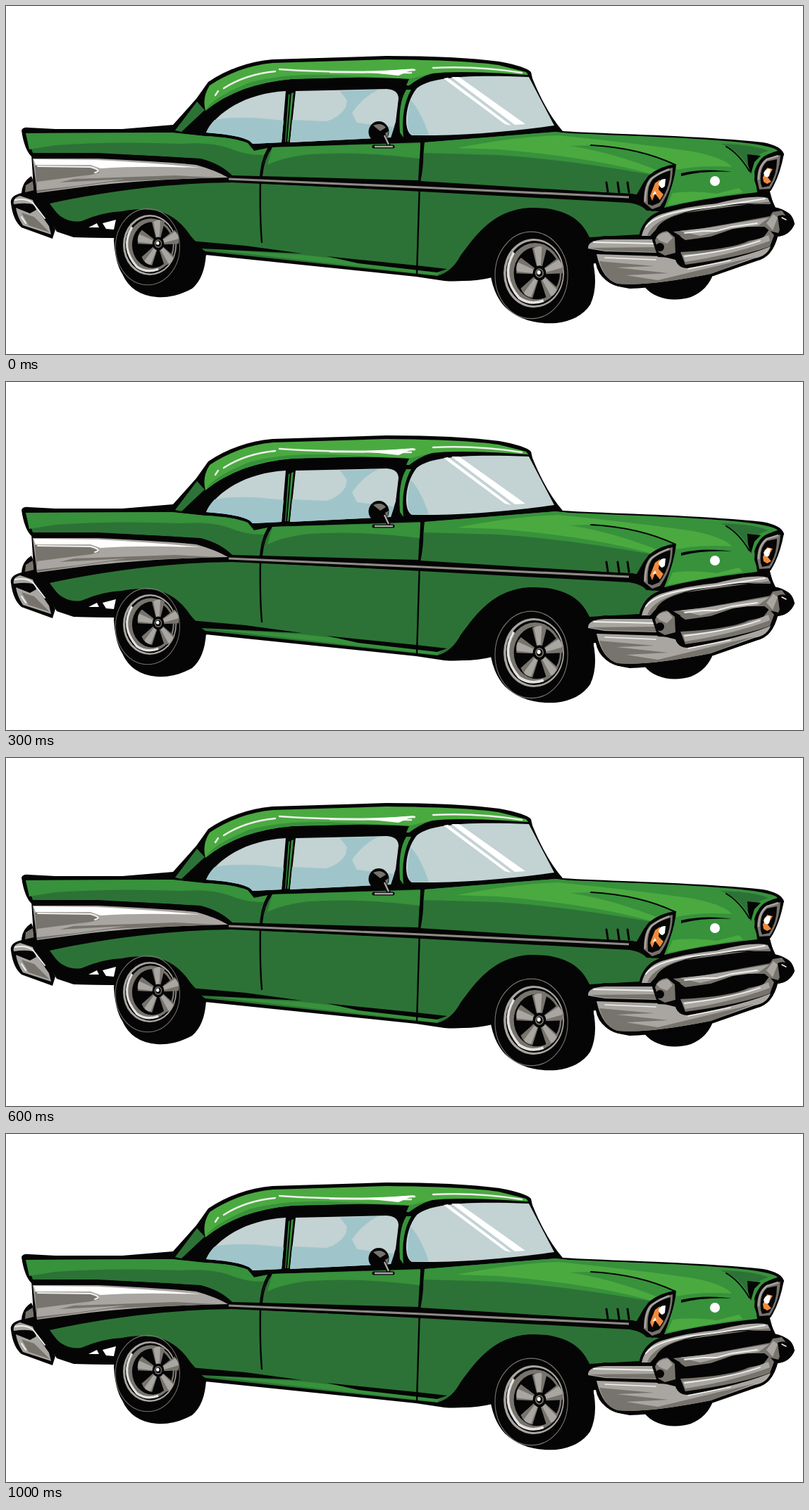
Recreate the animation shown at these times as an HTML page. Size 1131 by 495 pixels, loop 1100 ms.

```html
<!DOCTYPE html>
<html lang="en">
<head>
<meta charset="utf-8">
<title>Green classic car</title>
<style>
html, body { margin: 0; width: 100%; height: 100%; overflow: hidden; background: #fff; }
svg { display: block; width: 100%; height: 100%; }
path { fill: none; }
.k { fill: #050505; }
.d { fill: #2c7236; }
.m { fill: #37923b; }
.b { fill: #4aaa40; }
.c { fill: #a9a6a2; }
.s { fill: #77736d; }
.w { fill: #fff; }
.g { fill: #c3d2d3; }
.t { fill: #9fc5ca; }
.o { fill: #f08a3c; }
.ln { stroke: #050505; stroke-width: 3; stroke-linecap: round; stroke-linejoin: round; }
.hi { stroke: #eef0ec; stroke-width: 2; stroke-linecap: round; }
</style>
</head>
<body>
<svg viewBox="0 0 1131 495" preserveAspectRatio="none">
<g id="car">
  <!-- far front wheel, silhouette -->
  <path class="k" d="M905 398C922 420 952 420 972 414Q996 404 1004 380Z"/>
  <path class="k" d="M22 177Q24 172 32 173L70 175L165 175L237 169L270 132L287 108C314 90 344 79 378 76L540 71Q640 71 700 79Q738 86 745 94L747 103Q766 150 790 178C850 182 980 184 1074 194Q1101 199 1104 211Q1094 234 1084 264L1090 286Q1114 290 1119 310Q1112 326 1095 328Q1088 354 1070 361L1003 384Q930 401 885 402Q842 396 837 366L690 382Q655 394 622 391L582 385L283 354L160 330L96 329L72 321L40 268L37 215Q26 205 22 177Z"/>

  <!-- rear bumper -->
  <path class="k" d="M36 242Q23 250 22 266Q5 270 7 281Q10 305 22 315L66 331L70 318L50 275Z"/>
  <path class="c" d="M20 270Q9 273 11 282Q31 279 40 283L61 313L64 325L24 312Q16 300 14 287L34 295L43 290L38 276Z"/>
  <path class="s" d="M22 294L40 300L62 322L32 312ZM28 255L38 249L40 262L27 265Z"/>
  <path class="hi" d="M13 276Q28 273 38 280L55 302M22 300L28 309"/>

  <!-- fin and upper side -->
  <path class="d" d="M28 181L235 180L282 185Q324 187 343 195L352 206L372 202L360 242L321 241Q304 224 276 217L130 209L38 209Z"/>
  <path class="m" d="M28 181L235 180L282 185Q324 187 343 195L352 206L372 202L366 212Q338 212 316 202Q290 193 250 196Q150 192 70 198L33 204Z"/>
  <path class="d" d="M378 201L588 194L585 248L364 242Q366 218 378 201Z"/>
  <path class="m" d="M378 201L588 195L587 217Q500 206 430 211Q390 216 371 226Z"/>
  <path class="d" d="M594 194L780 179C850 187 900 196 947 225Q912 236 903 254L895 268L588 249Z"/>
  <path class="m" d="M594 194L780 179C850 187 900 196 947 225Q928 231 916 240Q800 219 700 212L593 209Z"/>

  <!-- hood and nose -->
  <path class="m" d="M780 180C880 185 990 187 1060 196Q1092 201 1095 206Q1068 213 1062 236L1066 265Q1010 271 960 281L934 287Q948 252 950 225Q900 206 827 198L760 190Z"/>
  <path class="b" d="M640 202Q720 186 784 184Q900 196 975 207Q1020 216 1030 229Q985 226 952 233L948 224Q900 205 830 198L800 199Q860 208 925 234L916 239Q830 215 700 204Z"/>
  <path class="b" d="M946 266Q972 262 1008 267L1040 259L1046 265Q1000 272 938 284Z"/>
  <path class="d" d="M1014 196Q1042 205 1057 235L1063 220Q1064 211 1082 206Q1060 197 1014 196Z"/>
  <path class="k" d="M1052 211L1071 213L1062 222L1057 239L1053 226ZM958 238Q990 230 1030 236Q990 234 958 242Z"/>
  <path class="ln" d="M830 198Q900 202 950 226M1022 200Q1040 210 1055 235" style="stroke-width:2"/>
  <circle class="w" cx="1006" cy="249" r="7"/>

  <!-- lower side -->
  <path class="d" d="M62 281Q175 252 318 250L590 264L885 280Q903 283 909 291L928 292Q902 306 899 325L828 329C813 295 780 286 742 287C692 291 668 325 645 355Q633 378 612 384L583 381L283 349L266 338C250 304 225 287 190 290C154 290 124 316 90 312Q75 300 62 281Z"/>
  <path class="m" d="M286 346L420 354L582 371L620 375L612 383L583 380Z"/>
  <path class="k" d="M262 334L340 341L420 352L278 345ZM455 356L582 369L626 374L612 379L500 366Z"/>
  <path class="ln" d="M373 201Q361 222 361 250Q360 300 363 336M589 195Q594 214 587 250L583 382" style="stroke-width:2.4"/>
  <path class="ln" d="M852 251L854 264M868 251L870 265M882 251L884 265"/>

  <!-- chrome flash and trim -->
  <path class="k" d="M36 211L130 210Q250 214 282 219Q306 228 322 242L890 267L902 277L320 251Q200 252 65 280L40 272Z"/>
  <path class="c" d="M38 217L130 217Q235 222 270 226Q298 234 315 244Q210 246 120 256L44 266Z"/>
  <path class="s" d="M41 227L122 229L133 237L96 246L240 241L300 244L150 250L44 265Z"/>
  <path class="c" d="M44 250L120 240L76 251L170 246L100 256L44 262Z"/>
  <path class="w" d="M39 218L130 219Q220 224 276 230Q190 227 134 231L120 226L42 226Z"/>
  <path class="hi" d="M45 228L120 229Q138 234 126 237"/>
  <path d="M316 246L590 258L884 272" stroke="#8f8b86" stroke-width="3.2"/>

  <!-- roof -->
  <path class="d" d="M271 136L282 148L249 179L240 177Z"/>
  <path class="b" d="M283 149Q278 130 289 113C315 96 344 84 379 81L540 76Q650 77 699 84L738 94L741 98Q640 91 605 96Q584 101 572 113Q490 100 405 104Q370 107 338 118Q306 130 283 149Z"/>
  <path class="m" d="M284 147Q294 130 345 109Q400 94 480 99L575 103L603 96Q585 103 572 113Q490 100 405 104Q370 107 338 118Q306 130 284 147Z"/>
  <path class="k" d="M400 108Q470 98 572 104L566 117L400 119Z"/>
  <path class="hi" d="M309 117Q340 97 382 93M297 127L301 121M388 90Q490 97 580 91M460 94L575 95M606 88Q670 85 732 95" style="stroke-width:2.4"/>
  <path class="w" d="M510 94L580 89L557 99Z"/>

  <!-- windows -->
  <path class="g" d="M284 180C299 151 340 124 397 121L391 194L350 196Q342 184 284 180Z"/>
  <path class="t" d="M284 180Q288 170 296 162Q330 155 394 163L391 194L350 196Q342 184 284 180Z"/>
  <path class="m" d="M401 126L408 123L401 193L396 193Z"/>
  <path class="ln" d="M404 122L398 194" style="stroke-width:2"/>
  <path class="g" d="M411 121L540 118Q557 119 557 132L553 165L546 187L403 194Z"/>
  <path class="t" d="M474 121L528 119Q506 130 491 152L498 166L551 172L546 187L403 194L406 162L455 164Q474 158 482 144L484 134Z"/>
  <path class="m" d="M568 119Q556 138 559 180L564 187Q560 145 575 119Z"/>
  <path class="g" d="M583 117C600 102 650 97 742 101L778 170Q670 185 576 184C563 178 566 137 583 117Z"/>
  <path class="t" d="M574 134Q588 148 600 183L576 184Q565 175 574 134Z"/>
  <path class="w" d="M621 103L627 102L717 170L708 168ZM632 101L643 101L737 168L722 169Z"/>

  <!-- mirror -->
  <path class="ln" d="M536 188L543 197M522 200H549" style="stroke-width:5"/>
  <ellipse class="k" cx="529" cy="179" rx="14.5" ry="15"/>
  <path d="M537 184L543 197M523 200H549" stroke="#a9a6a2" stroke-width="2.4"/>
  <path class="s" d="M521 170Q533 165 539 173L531 178ZM538 181L543 178L541 188Z"/>

  <!-- wheel arches, underbody and near wheels -->
  <path class="k" d="M612 388Q637 377 650 349C672 317 700 288 744 288C786 287 815 302 833 349L835 390L690 386Q655 395 612 388Z"/>
  <path class="k" d="M64 286Q83 310 107 306Q137 293 165 292C207 283 245 296 266 340L285 354L250 374L158 330L98 329Z"/>
  <path class="w" d="M117 315L129 309L132 315ZM137 309L156 304L153 318L142 317Z"/>
  <path class="k" d="M153 333Q155 294 194 291Q236 287 262 327L284 352Q282 387 264 402Q238 416 214 414Q178 411 165 381Q155 366 153 333Z"/>
  <path class="k" d="M686 372Q692 323 738 314Q807 302 831 357Q842 397 829 425Q814 447 781 451Q735 454 708 428Q690 409 686 372Z"/>
  <g id="wheels"></g>

  <!-- headlights -->
  <path class="k" d="M901 280Q902 252 912 241Q929 227 951 225Q948 259 930 287L917 292Z"/>
  <path class="s" d="M905 279Q905 253 915 244Q928 234 946 230Q946 260 928 285L917 289Z"/>
  <path class="k" d="M911 282Q909 256 918 246Q928 238 943 234Q943 258 927 280L917 284Z"/>
  <path d="M907 278Q907 254 917 245Q928 237 941 232" stroke="#a9a6a2" stroke-width="2.4"/>
  <path class="o" d="M914 270L921 252L928 247L926 261L933 268L928 276L921 267L917 277Z"/>
  <path class="w" d="M926 253Q928 245 936 246L935 256Q930 263 926 253ZM917 269L921 263L923 267Z"/>
  <path class="k" d="M1062 248Q1063 222 1077 213Q1091 206 1104 210Q1098 243 1085 263L1068 265Z"/>
  <path class="s" d="M1066 247Q1066 226 1079 217L1099 212Q1097 241 1084 260L1069 261Z"/>
  <path class="k" d="M1071 252Q1069 230 1080 221L1094 218Q1094 241 1083 256L1073 258Z"/>
  <path d="M1068 247Q1068 227 1080 218L1096 213" stroke="#a9a6a2" stroke-width="2.4"/>
  <path class="o" d="M1074 244L1080 230L1088 232L1081 244L1086 250L1080 253L1075 250Z"/>
  <path class="w" d="M1075 238Q1078 230 1085 232L1083 242Q1077 246 1075 238Z"/>

  <!-- front bumper and grille -->
  <path class="k" d="M898 330Q902 303 925 293Q955 282 1000 277Q1060 264 1084 269L1093 289Q1116 290 1119 310Q1113 326 1095 328Q1087 358 1066 362L1004 384Q910 404 869 399Q841 392 835 357L822 347Q821 330 850 327Z"/>
  <path class="c" d="M902 327Q907 304 930 296Q965 285 1008 281Q1060 268 1081 273L1085 281Q1020 278 965 293Q930 301 922 318L914 327Z"/>
  <path class="s" d="M910 326Q919 304 959 295L1084 278L1085 282Q1020 280 965 294Q930 302 922 318L914 327Z"/>
  <path class="hi" d="M908 314Q920 298 967 290Q1030 282 1077 274"/>
  <path class="c" d="M826 345Q825 333 850 332L922 332Q932 342 926 351L850 349Z"/>
  <path class="s" d="M828 344L925 343L924 350L850 348Z"/>
  <path class="hi" d="M834 336L880 337L919 338"/>
  <path class="c" d="M838 353L930 356L950 361Q954 373 967 373Q1040 360 1085 342Q1080 356 1062 359L1000 381Q910 399 868 395Q846 389 838 353Z"/>
  <path class="s" d="M842 363L920 370L866 372L940 380L880 383L925 390L1062 357L1000 381Q910 399 868 395Q850 390 842 363Z"/>
  <path class="hi" d="M850 358L922 361M968 374L1028 362" style="stroke-width:1.4"/>
  <path class="s" d="M946 321L985 317Q1035 308 1084 299L1078 314L1040 314L1000 328L964 333Z"/>
  <path class="c" d="M956 320L1000 315L1083 301L1068 312L1023 318L985 327Z"/>
  <path class="s" d="M957 350Q1030 346 1054 334L1074 330L1083 318L1090 326L1084 342Q1040 358 964 368Z"/>
  <path class="c" d="M960 354Q1030 348 1058 335L1082 326L1084 334Q1030 354 964 364Z"/>
  <path class="hi" d="M963 323L990 320L1008 320L1030 314L1066 309M963 356Q1030 348 1070 334" style="stroke-width:1.8"/>
  <path class="k" d="M917 333Q920 318 938 316L957 327L962 346L948 358L925 357Z"/>
  <path class="s" d="M921 333Q925 321 938 320L949 329L950 351L935 355L926 350Z"/>
  <path class="c" d="M923 329Q930 321 940 322L946 330L938 338L928 334Z"/>
  <circle class="k" cx="928" cy="343" r="6"/>
  <path class="s" d="M1075 313L1088 293L1101 291L1107 299L1096 323L1084 320Z"/>
  <path class="c" d="M1079 309L1089 296L1095 301L1088 319Z"/>
  <path class="k" d="M1095 299Q1108 293 1117 309Q1110 323 1098 320Z"/>
  <path class="hi" d="M1101 301L1107 304" style="stroke-width:1.5"/>
</g>
</svg>
<script>
const car = document.getElementById('car');
const lift = [0, 10, -5, 5, -5, 3, -7, 3, -5, 1, -2];

// Rim of nominal radius 50, squeezed to fit each wheel.
function wheel(x, y, rx, ry, hubX, hubY) {
  const scale = `scale(${rx / 50} ${ry / 50})`;
  let spokes = '';
  for (let i = 0; i < 5; i++)
    spokes += `<g transform="rotate(${i * 72})"><path class="s" d="M-4-8L-12-36Q0-43 12-36L4-8Z"/>
      <path class="c" d="M-3-8L-9-36Q0-41 4-38L2-8Z"/></g>`;
  return `<g transform="translate(${x} ${y}) ${scale}">
    <ellipse cx="-4" cy="3" rx="60" ry="63" fill="none" stroke="#77736d" stroke-width="1.3"/>
    <circle class="c" r="50"/><circle class="k" cx="1" r="47"/>
    <circle class="s" cx="2" r="44"/><circle class="k" cx="5" r="38"/>
    <path d="M-33-30Q-56 4-24 36Q-6 47 16 40" stroke="#e4e3e1" stroke-width="4"/>
  </g>
  <g transform="translate(${hubX} ${hubY}) ${scale}">${spokes}
    <circle class="k" r="11"/><circle class="s" r="7"/><circle class="k" r="5"/>
    <circle class="w" cx="-1" cy="-1" r="3"/></g>`;
}
document.getElementById('wheels').innerHTML =
  wheel(204, 340, 38, 43, 216, 338) + wheel(749, 380, 43, 49, 757, 380);

function draw(now) {
  const step = Math.floor(now % 1100 / 100);
  car.setAttribute('transform', `translate(0 ${lift[step]})`);
  requestAnimationFrame(draw);
}
draw(performance.now());
</script>
</body>
</html>
```
